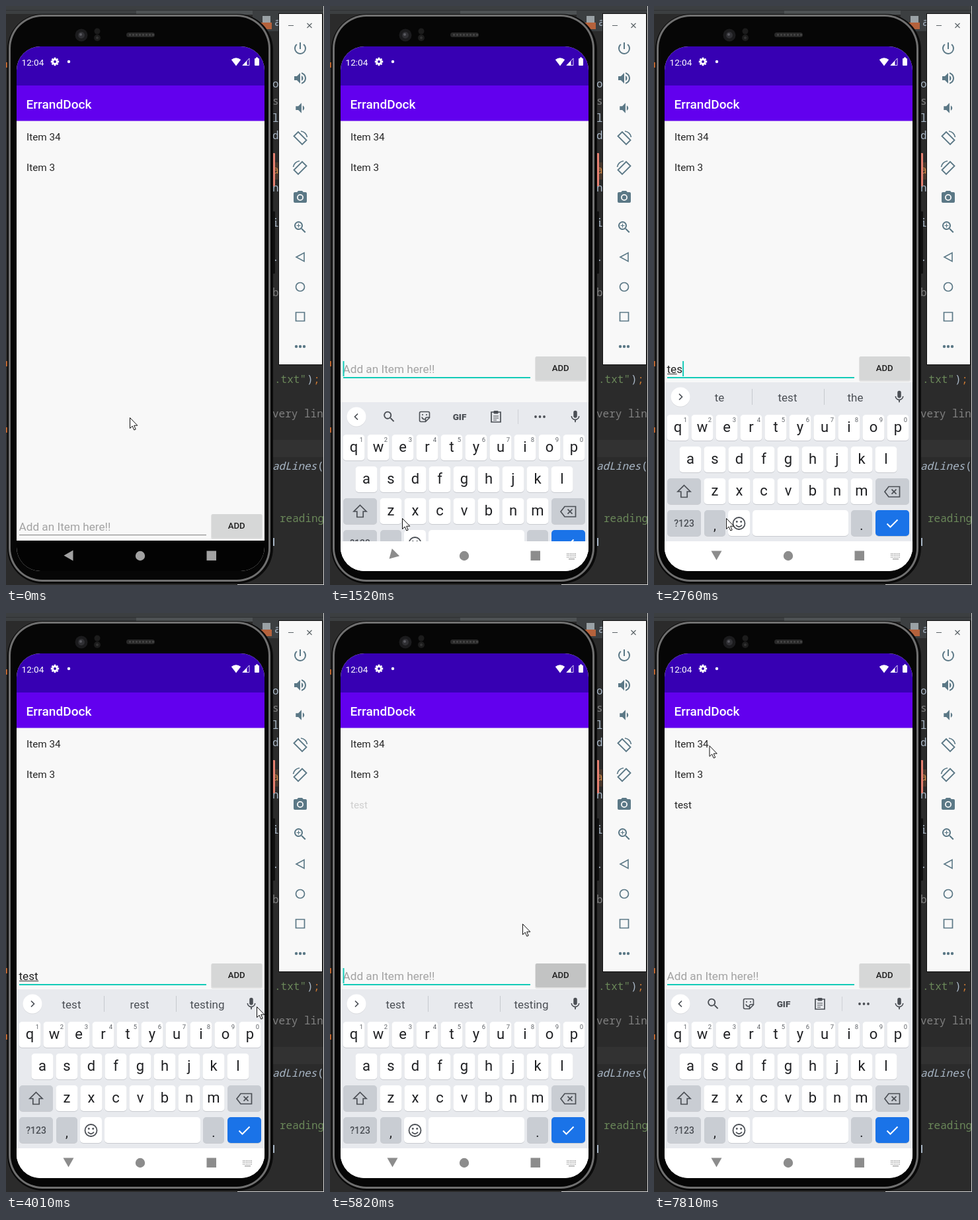
Write an HTML page with a canvas that moves like this. It is 481 px wide and 874 px high and loops after 8 s.

```html
<!DOCTYPE html>
<html lang="en">
<head>
<meta charset="utf-8">
<title>To-do demo</title>
<style>
html, body { margin: 0; width: 100%; height: 100%; overflow: hidden; background: #2b2b2b; }
canvas { display: block; width: 481px; height: 874px; }
</style>
</head>
<body>
<canvas id="stage" width="481" height="874"></canvas>
<script>
const ctx = document.getElementById('stage').getContext('2d');
const LOOP = 8000;
const TEAL = '#13cbb8', SLATE = '#5b7886', KEY_INK = '#202124', SOFT_INK = '#4b4f55';
const SANS = 'Roboto, sans-serif', MONO = '"Noto Sans Mono", monospace';

const ICONS = {
  power: 'M13 3h-2v10h2V3zm4.83 2.17l-1.42 1.42A6.92 6.92 0 0 1 19 12a7 7 0 1 1-11.42-5.42L6.17 5.17A8.93 8.93 0 0 0 3 12a9 9 0 0 0 18 0c0-2.74-1.23-5.18-3.17-6.83z',
  louder: 'M3 9v6h4l5 5V4L7 9H3zm13.5 3c0-1.77-1.02-3.29-2.5-4.03v8.05c1.48-.73 2.5-2.25 2.5-4.02zM14 3.23v2.06c2.89.86 5 3.54 5 6.71s-2.11 5.85-5 6.71v2.06c4.01-.91 7-4.49 7-8.77s-2.99-7.86-7-8.77z',
  quieter: 'M18.5 12c0-1.77-1.02-3.29-2.5-4.03v8.05c1.48-.73 2.5-2.25 2.5-4.02zM5 9v6h4l5 5V4L9 9H5z',
  camera: 'M9 2L7.17 4H4a2 2 0 0 0-2 2v12a2 2 0 0 0 2 2h16a2 2 0 0 0 2-2V6a2 2 0 0 0-2-2h-3.17L15 2zM12 17a5 5 0 1 1 0-10 5 5 0 0 1 0 10zM12 8.8a3.2 3.2 0 1 0 0 6.4 3.2 3.2 0 0 0 0-6.4z',
  search: 'M15.5 14h-.79l-.28-.27A6.5 6.5 0 1 0 13.73 14.43l.27.28v.79l5 5L20.5 19zM9.5 14a4.5 4.5 0 1 1 0-9 4.5 4.5 0 0 1 0 9z',
  mic: 'M12 14a3 3 0 0 0 3-3V5a3 3 0 0 0-6 0v6a3 3 0 0 0 3 3zm5.3-3c0 3-2.54 5.1-5.3 5.1S6.7 14 6.7 11H5c0 3.41 2.72 6.23 6 6.72V21h2v-3.28c3.28-.48 6-3.3 6-6.72z'
};

function box(x, y, w, h, color, r = 0) {
  ctx.fillStyle = color;
  ctx.beginPath();
  ctx.roundRect(x, y, w, h, r);
  ctx.fill();
}
function dot(x, y, r, color) {
  ctx.fillStyle = color;
  ctx.beginPath();
  ctx.arc(x, y, r, 0, Math.PI * 2);
  ctx.fill();
}
function fillPath(d, color, rule) {
  ctx.fillStyle = color;
  ctx.fill(new Path2D(d), rule || 'nonzero');
}
function strokePath(d, color, w = 1.5) {
  ctx.strokeStyle = color;
  ctx.lineWidth = w;
  ctx.stroke(new Path2D(d));
}
function text(s, x, y, size, color, { weight = 400, align = 'left', family = SANS, style = '' } = {}) {
  ctx.font = `${style} ${weight} ${size}px ${family}`;
  ctx.textAlign = align;
  ctx.fillStyle = color;
  ctx.fillText(s, x, y);
}
function at(x, y, draw, { angle = 0, scale = 1, flip = 1 } = {}) {
  ctx.save();
  ctx.translate(x, y);
  ctx.rotate(angle);
  ctx.scale(scale * flip, scale);
  draw();
  ctx.restore();
}
function icon(name, x, y, size, color) {
  at(x, y, () => {
    ctx.translate(-12, -12);
    fillPath(ICONS[name], color, 'evenodd');
  }, { scale: size / 24 });
}

// Each track holds its value until the next entry.
function hold(track, t) {
  let current = track[0];
  for (const entry of track) if (entry[0] <= t) current = entry;
  return current;
}
const POINTER = [
  [0, 187, 621], [120, 152, 689], [270, 120, 733], [420, 112, 753], [560, 110, 765], [710, 109, 773],
  [3620, 135, 795], [3760, 250, 760], [3890, 340, 660], [4010, 379, 594],
  [4160, 372, 570], [4310, 358, 556], [4460, 350, 550], [4610, 346, 548],
  [5820, 291, 469], [5960, 275, 400], [6110, 262, 340], [6250, 256, 300], [6400, 253, 280], [6690, 252, 271],
  [7120, 230, 265], [7260, 190, 245], [7400, 150, 225], [7540, 115, 210], [7680, 92, 202], [7810, 83.5, 200]
];
const TYPED = [[0, ''], [2210, 't'], [2490, 'te'], [2760, 'tes'], [3040, 'test'], [5050, '']];
const MARKED = [[0, ''], [2350, 't'], [2620, 'te'], [3040, 'test'], [5050, '']];
const WORDS = [[0, null], [2350, ['t', 'the', 'to']], [2620, ['te', 'test', 'the']],
  [3190, ['test', 'rest', 'testing']], [6110, null]];
const CARET = [[0, false], [1240, true], [3760, false], [4310, true], [6250, false], [6690, true], [7260, false]];
const BACK_TURN = [[0, 0], [1520, 45], [1660, 80], [1810, 90]];

function drawEditor() {
  box(0, 0, 481, 874, '#2b2b2b');
  box(0, 0, 481, 12, '#3c3f41');
  box(197, 7, 176, 6, '#4e5254');
  box(373, 12, 40, 26, '#3c3f41');
  box(388, 15, 12, 11, '#9aa1a5');
  box(385, 25, 17, 10, '#b5623c');
  box(0, 6, 481, 1, '#2f3133');
  box(400, 236, 12, 26, '#49382d');
  box(400, 655, 81, 26, '#323232');
  const code = (s, x, y, color, style) => text(s, x, y, 16, color, { family: MONO, style });
  const plain = '#a9b7c6', grey = '#808080', green = '#6a8759';
  code('a', 406, 30, plain);
  [['o', 123], ['s', 149, grey], ['l', 175], ['d', 201], ['a', 253, '#c98546'], ['n', 280],
    ['i', 333], ['.', 385], ['b', 438, grey]].forEach(([s, y, c]) => code(s, 403, y, c || plain));
  code('.txt"', 406, 569, green);
  code(')', 455, 569, plain);
  code(';', 465, 569, '#cc7832');
  code('very lin', 403, 621, grey);
  code('adLines', 403, 700, plain, 'italic');
  code('(', 471, 700, plain);
  code('reading', 414, 779, green);
  box(403, 803, 3, 12, plain);
  [85, 536, 636].forEach(y => box(0, y, 2, 8, '#b9642f'));
  box(350, 873, 131, 1, '#d4d4d4');
  box(480, 0, 1, 874, '#d4d4d4');
}

function drawPhone() {
  box(402, 222, 5, 50, '#e58071', 1);
  box(402, 310, 5, 94, '#101010', 1);
  box(2, 12, 402, 860, '#0a0a0a', 54);
  box(4, 13, 396, 856, '#707070', 51);
  box(7, 16, 390, 850, '#060606', 48);
  dot(114, 44, 9.5, '#1b1b1d');
  dot(114, 44, 5, '#303034');
  dot(113, 43, 2, '#59595f');
  dot(138, 38, 4.5, '#1c1c1c');
  dot(138, 48, 5, '#1c1c1c');
  dot(138, 48, 2, '#333');
  box(182, 40, 43, 7, '#282828', 3.5);
  for (let x = 186; x < 222; x += 5) box(x, 42, 3, 3, '#454545', 1);
}

function drawPanel() {
  box(412, 11, 67, 531, '#111');
  box(413, 12, 65, 529, '#f8f8f8');
  strokePath('M427 29.5h8M455.5 26l7 7m0-7l-7 7', '#5c6468', 1.2);
  icon('power', 445, 64, 24, SLATE);
  icon('louder', 445, 109, 24, SLATE);
  icon('quieter', 445, 154, 23, SLATE);
  [[199, 1], [244, -1]].forEach(([y, flip]) => at(445, y, () => {
    strokePath('M-9.5-2.5L-3-9 9.5 3.5 3 10Z', SLATE, 1.8);
    strokePath('M1-10A10.5 10.5 0 0 1 10.5-1', SLATE, 1.7);
  }, { flip }));
  icon('camera', 445, 289, 24, SLATE);
  icon('search', 445, 334, 24, SLATE);
  strokePath('M439.5 331.5h6m-3-3v6', SLATE, 1.2);
  strokePath('M439 379l12-6.5v13Z', SLATE, 1.6);
  strokePath('M438.5 424a6.5 6.5 0 1 0 13 0a6.5 6.5 0 1 0-13 0M438.5 462.5h13v13h-13Z', SLATE, 1.7);
  [439, 445, 451].forEach(x => dot(x, 514, 2.2, SLATE));
}

function drawAppBars() {
  box(16, 61, 375, 59, '#3700b3');
  box(16, 120, 375, 53.5, '#6200ee');
  text('12:04', 23.5, 89.5, 13.6, '#fff');
  at(74, 84, () => {
    for (let i = 0; i < 8; i++) {
      ctx.rotate(Math.PI / 4);
      box(-1.4, -6.2, 2.8, 3, '#fff');
    }
    strokePath('M-3.3 0a3.3 3.3 0 1 0 6.6 0a3.3 3.3 0 1 0-6.6 0', '#fff', 2.6);
  });
  dot(95, 84, 2.2, '#fff');
  fillPath('M348 90.5L340.8 81Q348 75.5 355.2 81Z', '#fff');
  strokePath('M368 79v10.5h-10Z', '#d9cef4', 1);
  fillPath('M364.5 82.8V90H357.5Z', '#fff');
  box(376, 79, 7, 11, '#fff', 1);
  box(378, 77.5, 3, 2, '#fff');
  text('ErrandDock', 30.5, 154.5, 19.1, '#fff', { weight: 500 });
}

function drawInput(t, shift) {
  const focused = t >= 1110, typed = hold(TYPED, t)[1], marked = hold(MARKED, t)[1];
  at(0, -shift, () => {
    if (typed) {
      text(typed, 19.5, 791.5, 17.2, '#212121');
      if (marked) box(20, 793, ctx.measureText(marked).width, 1, '#333');
    } else {
      text('Add an Item here!!', 19.5, 791.5, 17.2, '#a3a3a3');
    }
    if (focused) box(20, 798, 283, 2, TEAL);
    else box(20, 798, 283, 1, '#808080');
    if (hold(CARET, t)[1]) {
      ctx.font = `400 17.2px ${SANS}`;
      box(19.5 + ctx.measureText(typed).width, 774, 2, 23, TEAL);
    }
    const pressed = t >= 4910 && t < 5960;
    box(310, 767, 78, 38, '#e2e2e2', 3);
    box(311, 767, 76, 36, pressed ? '#c2c3c3' : '#d6d7d7', 2);
    text('ADD', 348.7, 789, 13.2, '#212121', { weight: 500, align: 'center' });
  });
}

function key(x, y, w, color = '#fff', h = 39) {
  box(x, y + 1, w, h, '#c9cbd0', 5);
  box(x, y, w, h, color, 5);
}

function drawStrip(t) {
  const words = hold(WORDS, t)[1];
  dot(40, 591, 14.5, '#d9dbdf');
  dot(40, 590, 14.5, '#fff');
  strokePath(words ? 'M38 585.5l4.5 4.5-4.5 4.5' : 'M42 585.5l-4.5 4.5 4.5 4.5', SOFT_INK, 1.7);
  icon('mic', 371, 590, 22, SOFT_INK);
  if (words) {
    words.forEach((word, i) => text(word, [99, 202, 304.5][i], 596.5, 17, SOFT_INK, { align: 'center' }));
    box(148, 578, 1, 24, '#c6c9ce');
    box(257, 578, 1, 24, '#c6c9ce');
    return;
  }
  icon('search', 89.5, 590, 22, SOFT_INK);
  strokePath('M137.5 582.5h11q2 0 2 2v7l-6 6h-7q-2 0-2-2v-11q0-2 2-2ZM150.5 591h-4q-2 0-2 2v4.5M139 590.5q1 4 5 3', SOFT_INK, 1.6);
  [140, 146].forEach(x => dot(x, 587, 1.1, SOFT_INK));
  text('GIF', 196, 594.5, 13.5, SOFT_INK, { weight: 900, align: 'center' });
  strokePath('M244 583h14v15h-14Z', SOFT_INK, 1.7);
  box(247.5, 581, 7, 4.5, SOFT_INK, 1);
  strokePath('M247 589h8m-8 3h8m-8 3h5', SOFT_INK, 1.2);
  box(284, 579, 1, 22, '#cfd1d6');
  [311, 317.5, 324].forEach(x => dot(x, 590, 1.9, SOFT_INK));
}

function drawKeyboard(t) {
  box(16, 568, 375, 260, '#e8eaee');
  drawStrip(t);
  const rows = [['qwertyuiop', 36, 617], ['asdfghjkl', 55, 665], ['zxcvbnm', 92, 713]];
  rows.forEach(([letters, start, y], row) => [...letters].forEach((letter, i) => {
    const x = start + i * 37;
    key(x - 16.5, y, 33);
    text(letter, x, y + 26, 22, KEY_INK, { align: 'center' });
    if (!row) text(String((i + 1) % 10), x + 11.5, y + 10.5, 9.5, '#5f6368', { align: 'center' });
  }));
  const dark = '#c9cdd3';
  key(20, 713, 51, dark);
  key(335, 713, 51, dark);
  key(20, 761, 51, dark);
  key(76, 761, 32, dark);
  key(112, 761, 33);
  key(149, 761, 145);
  key(298, 761, 32, dark);
  key(335, 761, 51, '#1a73e8');
  strokePath('M45.5 723.5l9.5 9.5h-4.8v8.5h-9.4V733H36Z', SOFT_INK, 1.7);
  strokePath('M355 725.5h16.5v15.5H355l-6-7.75ZM359.5 729.7l7 7m0-7l-7 7', SOFT_INK, 1.7);
  text('?123', 45.5, 786, 14, SOFT_INK, { weight: 500, align: 'center' });
  text(',', 92, 791, 20, KEY_INK, { align: 'center' });
  text('.', 314, 791, 20, KEY_INK, { align: 'center' });
  strokePath('M119.5 781a9 9 0 1 0 18 0a9 9 0 1 0-18 0M124 783.5q4.5 5.5 9 0', SOFT_INK, 1.8);
  [125.3, 131.7].forEach(x => dot(x, 778.5, 1.4, SOFT_INK));
  strokePath('M352.5 781.5l5 5 11-11', '#fff', 2);
}

function drawNav(t) {
  const light = t >= 1520, grey = light ? '#8c8c8c' : '#a2a2a2';
  box(16, light ? 808 : 807, 375, 47, light ? '#fff' : '#030303');
  at(94.5, 829.5, () => fillPath('M-7 0L7-8V8Z', grey), { angle: -hold(BACK_TURN, t)[1] * Math.PI / 180 });
  dot(203, 830, 7.2, grey);
  box(303.5, 822.5, 14.5, 14.5, grey);
  if (t < 1370) return;
  const small = light ? '#aaa' : '#a2a2a2';
  for (let row = 0; row < 3; row++)
    for (let col = 0; col < 6; col++) box(358 + col * 2.5, 826 + row * 2.6, 1.5, 1.5, small);
  box(361, 834, 9, 1.5, small);
}

function drawScreen(t) {
  ctx.save();
  ctx.beginPath();
  ctx.roundRect(16, 61, 375, 792, 36);
  ctx.clip();
  box(16, 61, 375, 792, '#f8f8f8');
  drawAppBars();
  text('Item 34', 31, 202.5, 15.3, '#262626');
  text('Item 3', 31, 248.5, 15.3, '#262626');
  if (t >= 5200) text('test', 31, 294.5, 15.3, t < 5960 ? '#cfcfcf' : '#262626');
  const open = t >= 1520;
  drawInput(t, open ? 238 : 0);
  if (open) at(0, t < 1660 ? 30 : 0, () => drawKeyboard(t));
  drawNav(t);
  ctx.restore();
}

function drawPointer(t) {
  const [, x, y] = hold(POINTER, t);
  at(x + 0.5, y + 0.5, () => {
    const arrow = 'M0 0V16L3.7 12.6 6.3 18.5 8.7 17.5 6.2 11.7H11.3Z';
    fillPath(arrow, '#fff');
    strokePath(arrow, '#111', 1);
  });
}

function frame(now) {
  const t = now % LOOP;
  drawEditor();
  drawPhone();
  drawScreen(t);
  drawPanel();
  drawPointer(t);
  requestAnimationFrame(frame);
}
requestAnimationFrame(frame);
</script>
</body>
</html>
```
